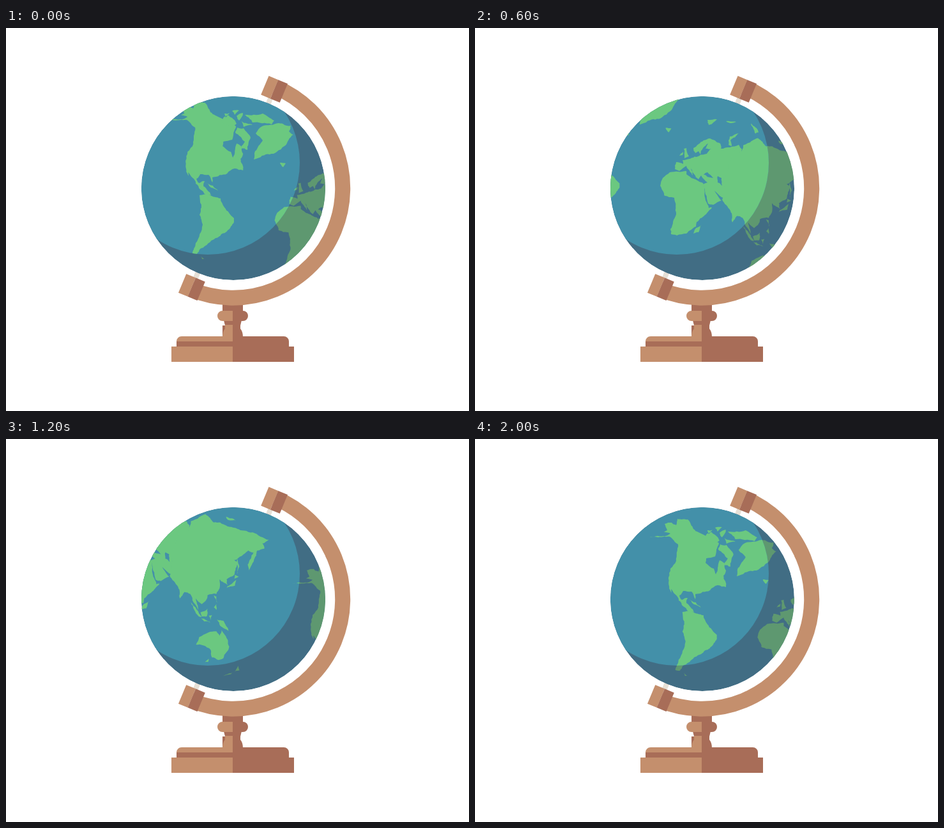
Write an HTML page that moves like this. It is 725 by 600 pixels and loops after 2100 ms.

```html
<!DOCTYPE html>
<html lang="en">
<head>
<meta charset="utf-8">
<title>Globe</title>
<style>
  html, body { margin: 0; width: 100%; height: 100%; overflow: hidden; background: #fff; }
  svg { display: block; }
  .light { fill: #c48f6d; }
  .dark { fill: #a86d58; }
</style>
</head>
<body>
<svg width="725" height="600" viewBox="0 0 725 600">
  <defs>
    <clipPath id="ball"><circle cx="356" cy="251" r="144"/></clipPath>
    <clipPath id="lit"><circle cx="316" cy="211" r="144"/></clipPath>

    <!-- each coastline lies where it is seen at its data-step -->
    <g id="lands" fill-rule="evenodd">
      <path id="north-america" data-step="20" d="M273 154 298 152 306 148 296 146 301 143 297 133 308 131 315 135 317 125 333 126 342 141 358 150 370 155 382 163 376 184 362 187 361 194 374 203 377 212 380 202 383 190 390 194 393 206 389 214 393 232 380 229 368 237 345 243 345 251 339 239 326 238 320 245 324 252 333 249 331 257 343 271 334 270 319 253 307 235 310 245 304 234 303 217 306 203 315 191 318 165 305 153Z"/>
      <path id="cuba" data-step="0" d="M311 240 324 247 332 255 321 250Z"/>
      <path id="arctic" data-step="0" d="M340 141 349 137 361 150 353 155 338 148Z M342 134 350 133 344 140Z M354 130 365 129 358 136Z M361 138 371 133 365 145Z M374 136 402 134 420 145 416 151 386 148Z M369 146 386 152 372 155Z M362 156 372 157 383 172 378 191 368 188 374 178 359 164Z"/>
      <path id="greenland" data-step="0" d="M388 206 390 193 402 176 391 165 401 154 427 149 446 153 443 162 450 167 436 185 424 194 401 200Z M429 211 438 212 434 218Z"/>
      <path id="south-america" data-step="0" d="M303 262 318 261 336 267 342 281 357 298 357 304 347 317 320 335 304 346 299 354 292 353 297 337 308 308 303 293 306 277Z M305 357 313 363 307 362Z"/>
      <path id="africa" data-step="6" d="M290 247 294 235 305 226 331 224 331 229 342 236 357 243 361 270 366 282 371 281 347 304 346 311 331 322 316 325 307 323 306 315 315 292 312 266 296 262Z M342 322 344 316 355 308 350 320Z"/>
      <path id="europe" data-step="6" d="M357 245 365 275 373 277 386 270 375 255 386 265 402 266 418 190 413 183 385 189 384 181 368 173 358 176 342 188 345 196 350 193 353 198 357 188 365 181 361 189 370 189 363 197 325 207 326 213 315 210 313 221 320 224 331 216 341 231 338 220 350 237 354 231 364 242Z M358 230 364 226 373 235Z M380 232 386 235 387 247 380 242Z"/>
      <path id="northern-isles" data-step="6" d="M328 204 335 201 331 188 327 189Z M320 200 325 199 326 194Z M364 144 379 143 366 152Z M393 146 409 147 402 149Z M413 165 399 170 397 183 402 185 400 176Z"/>
      <path id="asia" data-step="10" d="M318 158 327 148 329 162 333 147 347 140 356 136 369 149 379 149 410 161 436 167 455 176 445 182 448 190 437 193 424 224 422 215 431 196 423 193 401 208 407 211 401 231 389 238 391 247 378 238 378 252 373 261 359 263 356 272 350 277 341 268 344 286 332 261 323 258 316 268 313 250 300 232 305 195Z"/>
      <path id="asian-isles" data-step="10" d="M345 113 357 127 352 129Z M388 140 404 146 391 145Z M406 206 409 218 406 230Z M402 231 408 234 401 237Z M388 252 400 242 404 239 402 248Z M369 263 373 265 374 275Z M369 282 373 277 373 286Z M333 274 350 297 345 296Z M349 299 366 306 354 304Z M348 290 359 284 358 296 350 296Z M361 295 366 294 364 302Z M374 301 384 303 392 319 379 311Z"/>
      <path id="australia" data-step="14" d="M254 304 259 292 273 285 286 283 291 290 294 281 304 297 306 307 297 325 289 328 279 324 277 312 265 305Z M268 331 274 326 273 331Z M296 353 312 346 309 350Z M313 347 320 337 322 344Z"/>
    </g>
    <g id="world">
      <use class="copy" href="#lands"/>
      <use class="copy" href="#lands"/>
      <use class="copy" href="#lands"/>
    </g>
  </defs>

  <!-- foot -->
  <path class="dark" d="M339 430H371V443H339Z M341 458H369L367 466V471Q371 476 371 484H339V466H343Z"/>
  <path class="light" d="M355 443V459H339A8 8 0 0 1 339 443Z M355 465H343V471Q339 476 339 484H355Z"/>
  <path class="dark" d="M355 443H371A8 8 0 0 1 371 459H355Z"/>
  <path class="dark" d="M267 499V491H355V483H435A8 8 0 0 1 443 491V499H451V523H355V499Z"/>
  <path class="light" d="M267 491A8 8 0 0 1 275 483H355V491Z M259 499H355V523H259Z"/>

  <!-- arm, pins and caps along the tilted axis -->
  <g transform="translate(355.5 251) rotate(22.62)">
    <path d="M0 -171.7A171.7 171.7 0 0 1 0 171.7" fill="none" stroke="#c48f6d" stroke-width="24"/>
    <path d="M-4 -153H4V-140H-4Z M-4 140H4V153H-4Z" fill="#e6e0d6"/>
    <path class="light" d="M-16 -184H0V-152H-16Z M-16 152H0V184H-16Z"/>
    <path class="dark" d="M0 -184H16V-152H0Z M0 152H16V184H0Z"/>
  </g>

  <g clip-path="url(#ball)">
    <circle cx="356" cy="251" r="144" fill="#416d84"/>
    <use href="#world" fill="#5e9870"/>
    <g clip-path="url(#lit)">
      <circle cx="356" cy="251" r="144" fill="#4390a9"/>
      <use href="#world" fill="#6bc880"/>
    </g>
  </g>
</svg>
<script>
const STEPS = 21, STEP_MS = 100;
const DRIFT = { x: 21.76, y: 9.1 };   // map travel per step, along the tilted equator

let seed = 7;
const random = () => (seed = seed * 16807 % 2147483647) / 2147483647;
const shift = steps => `translate(${steps * DRIFT.x} ${steps * DRIFT.y})`;

// Splits an edge at jittered midpoints, for a ragged shore.
function shore([ax, ay], [bx, by]) {
  const dx = bx - ax, dy = by - ay, length = Math.hypot(dx, dy);
  if (length < 4) return [[bx, by]];
  const push = (random() - 0.5) * Math.min(0.24, 2.4 / length);
  const middle = [ax + dx / 2 - dy * push, ay + dy / 2 + dx * push];
  return [...shore([ax, ay], middle), ...shore(middle, [bx, by])];
}

function roughen(outline) {
  return outline.match(/M[^M]+/g).map(ring => {
    const points = [...ring.matchAll(/(\d+) (\d+)/g)].map(m => [+m[1], +m[2]]);
    const edges = points.flatMap((p, i) => shore(p, points[(i + 1) % points.length]));
    return 'M' + edges.map(p => p.map(n => n.toFixed(1)).join(' ')).join('L') + 'Z';
  }).join('');
}

for (const land of document.querySelectorAll('#lands path')) {
  land.setAttribute('d', roughen(land.getAttribute('d')));
  land.setAttribute('transform', shift(land.dataset.step));
}
document.querySelectorAll('.copy').forEach((copy, i) =>
  copy.setAttribute('transform', shift((i - 1) * STEPS)));

const world = document.getElementById('world');
const start = performance.now();

function draw(now) {
  const step = Math.floor(Math.max(0, now - start) / STEP_MS) % STEPS;
  world.setAttribute('transform', shift(-step));
  requestAnimationFrame(draw);
}
draw(start);
</script>
</body>
</html>
```
